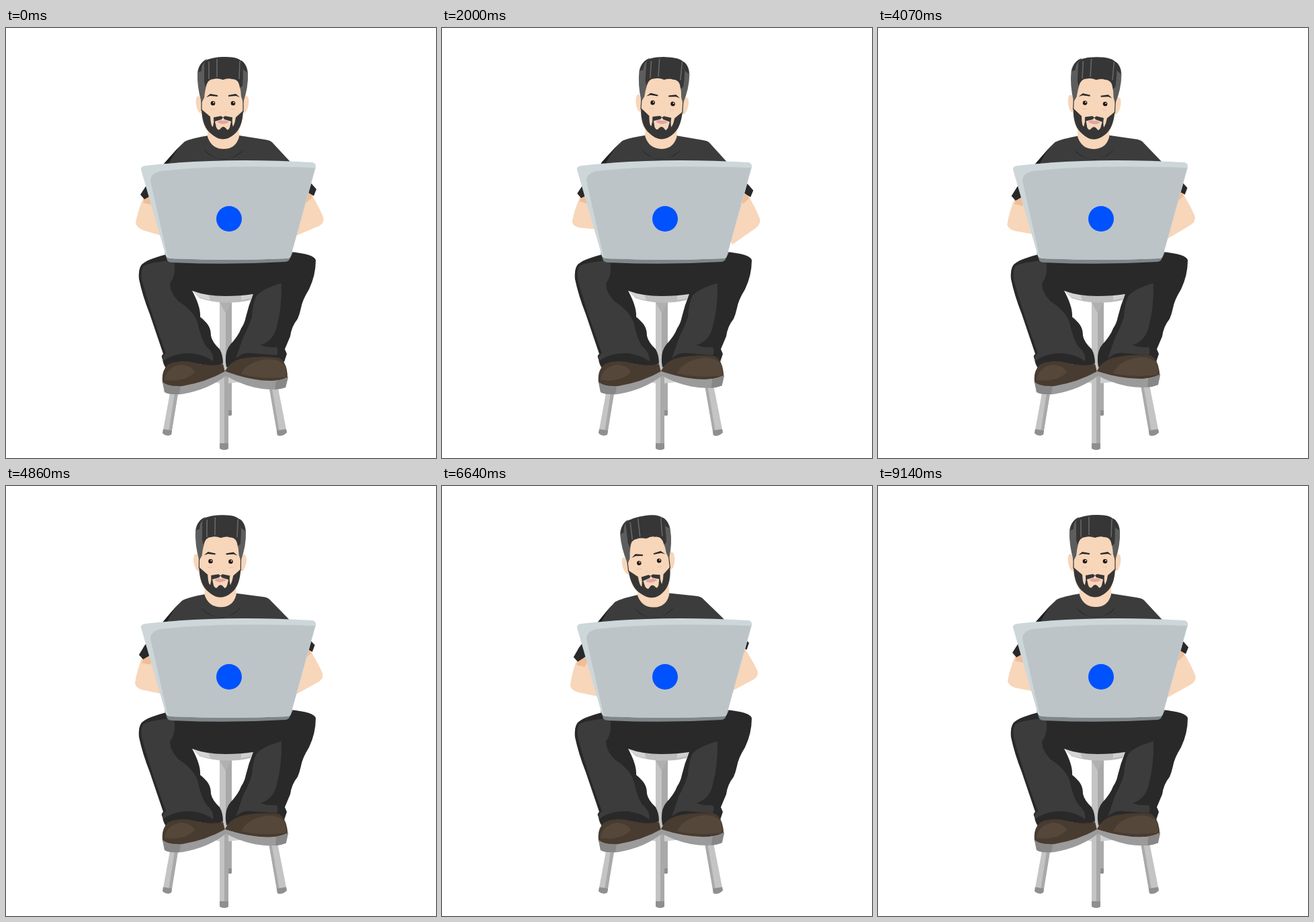
Write an HTML page that moves like this. It is 640 px wide and 640 px high and loops after 9.21 s.

```html
<!DOCTYPE html>
<html lang="en">
<head>
<meta charset="utf-8">
<title>Man typing on a stool</title>
<style>
  html, body { margin: 0; width: 100%; height: 100%; overflow: hidden; background: #fff; }
  svg { display: block; width: 100vw; height: 100vh; }
  .skin { fill: #f7d6ba; }
  .dark { fill: #292929; }
  .cloth { fill: #3c3c3c; }
  .hair { fill: #363636; }
  .steel { fill: #c4c4c4; }
  .shade { fill: #a9a9a9; }
  .tip { fill: #8f8f8f; }
</style>
</head>
<body>
<svg viewBox="0 0 640 640">
  <!-- stool -->
  <g>
    <path class="shade" d="M330 500H336V576Q333 578 330 576Z"/>
    <path class="tip" d="M330 569H336V576Q333 578 330 576Z"/>
    <path class="steel" d="M245 538H257L246 605Q239 609 233 603Z"/>
    <path class="shade" d="M252 538H257L246 605L241 607Z"/>
    <path class="tip" d="M234 597L247 599L246 605Q239 609 233 603Z"/>
    <path class="steel" d="M391 531H404L418 602Q411 609 404 606Z"/>
    <path class="shade" d="M391 531H395L408 607L404 606Z"/>
    <path class="tip" d="M403 599L417 597L418 602Q411 609 404 606Z"/>
    <path fill="#d0d0d0" d="M300 524L327 512L356 526L331 529L318 529Z"/>
    <path class="steel" d="M318 404H327V515H318Z"/>
    <path class="shade" d="M327 404H336V515H327Z"/>
    <path fill="#b0b0b0" d="M318 404H336V408L327 424L318 409Z"/>
    <path class="steel" d="M318 500H331V626Q325 630 318 626Z"/>
    <path class="shade" d="M325 515H331V626Q328 628 325 628Z"/>
    <path class="tip" d="M318 618H331V626Q325 630 318 626Z"/>
    <path fill="#bcbcbc" d="M275 388L288 402Q323 414 364 405L371 390Z"/>
    <path fill="#d4d4d4" d="M276 390L286 400Q295 404 304 405L301 396Z"/>
    <path fill="#d0d0d0" d="M350 398L370 394L366 402L350 405Z"/>
  </g>

  <!-- upper body -->
  <g id="body">
    <path id="leftArm" class="skin"/>
    <path id="rightArm" class="skin"/>
    <path fill="#efbd97" d="M208 250L204 260L216 263L224 250Z"/>
    <path fill="#efbd97" d="M453 246L456 252L447 260L440 245Z"/>
    <path class="dark" d="M225 215L209 234L200 248L206 255L222 246Z"/>
    <path class="dark" d="M435 215L455 232L462 240L458 250L440 239Z"/>
    <path class="cloth" d="M302 160Q276 164 266 169Q256 178 237 200L215 230L225 255H440L452 232L422 198L396 170Q393 167 385 166L347 160Z"/>
    <path fill="#202020" d="M261 173L235 202L242 202Q250 186 261 173Z"/>
    <path fill="#232323" d="M294 180Q324 211 354 180Q343 195 324 195Q305 195 294 180Z"/>
    <path class="skin" d="M300 140H347V162Q342 180 324 180Q306 180 300 162Z"/>

    <g id="head">
      <ellipse class="skin" cx="288" cy="114" rx="5" ry="13" transform="rotate(-10 288 114)"/>
      <ellipse class="skin" cx="356" cy="114" rx="5" ry="13" transform="rotate(10 356 114)"/>
      <path class="skin" d="M291 100Q293 72 323 72Q352 72 353 100V125Q351 164 323 164Q293 164 291 125Z"/>
      <path fill="#5d5d5d" d="M291 111Q284 87 285 66Q287 50 303 46V74Q297 84 295 104ZM353 111Q361 88 360 67Q359 50 343 46V74Q349 84 350 102Z"/>
      <path class="hair" d="M295 80V52Q299 44 323 43Q345 42 351 50Q354 62 352 86L348 89Q347 76 336 76Q331 74 323 77Q314 74 309 76Q300 76 297 88Z"/>
      <path class="hair" d="M286 66Q288 50 300 46L296 50Q291 54 291 64ZM350 48Q358 53 359 66L353 62Z"/>
      <path fill="none" stroke="#686868" stroke-width="1.6" d="M302 50V76M314 46V73M348 49L347 76"/>
      <path fill="none" stroke="#363636" stroke-width="1.2" d="M291 108V123M353 108V125"/>
      <path class="hair" d="M291 121L304 132Q305 147 308 147Q310 140 309 133L320 131L323 133L326 131L337 133Q336 142 338 147Q341 141 342 133L353 123Q352 148 340 158Q323 173 306 158Q292 148 291 121Z"/>
      <path class="skin" d="M311 139L321 136L323 133L325 136L335 139L333 148Q330 154 328 150Q323 144 319 150Q316 154 313 148Z"/>
      <path fill="#e2a5a3" d="M314 140Q319 136 323 138Q327 136 332 140Q323 146 314 140Z"/>
      <path class="dark" d="M298 103L304 98L315 100V102L304 101ZM348 103L342 98L331 100V102L342 101Z"/>
      <g fill="#241914">
        <circle cx="308" cy="112" r="3.3"/>
        <circle cx="338" cy="112" r="3.3"/>
      </g>
      <g fill="#fff">
        <circle cx="309" cy="111" r=".9"/>
        <circle cx="339" cy="111" r=".9"/>
      </g>
      <path fill="none" stroke="#f2c3a2" d="M304 121H311M334 121H341M318 124L319 126M328 124L327 126"/>
    </g>
  </g>

  <!-- trousers -->
  <path class="dark" d="M245 335C232 339 215 343 206 349Q196 354 198 374Q203 398 214 426L234 485Q230 488 233 493Q234 501 238 506Q252 496 270 497Q290 501 304 503Q316 504 323 499Q323 487 318 478Q307 468 305 458C305 446 301 440 289 430Q290 415 277 391Q298 399 326 399Q350 399 368 396Q361 413 357 430Q355 440 350 447Q346 458 334 471Q326 480 327 497L328 505L360 492L414 497L418 485L415 478L423 459Q425 444 434 433Q437 426 439 417Q441 405 451 389Q461 368 461 346Q460 336 420 333Z"/>
  <path class="cloth" d="M250 346Q214 348 204 355Q200 362 202 374Q213 416 238 484Q231 489 234 495Q252 483 276 484Q297 487 308 496Q311 485 298 474Q290 462 285 438Q279 421 257 407Q244 394 244 380Q254 368 250 346Z"/>
  <path class="cloth" d="M410 380Q384 387 373 398Q367 410 366 430Q361 446 353 460Q347 478 342 492Q352 482 366 484L403 487Q406 480 403 475Q389 476 379 472Q399 465 403 444Q411 415 410 380Z"/>

  <!-- shoes -->
  <path fill="#483b2f" d="M233 528Q231 510 241 501Q252 494 275 497Q302 505 323 500L326 512Q300 530 262 535L236 533Z"/>
  <path fill="#55473a" d="M236 524Q238 505 260 501Q277 502 281 512Q274 522 250 525Z"/>
  <path fill="#9b9b9b" d="M233 527Q240 534 262 533Q298 527 326 511L328 517Q302 538 262 545Q244 546 236 542Z"/>
  <path fill="#878787" d="M233 527Q244 535 260 533L258 545Q243 546 236 542Z"/>
  <g id="foot">
    <path fill="#483b2f" d="M326 511Q332 497 350 492Q380 487 407 491Q419 498 419 521Q396 529 360 523Z"/>
    <path fill="#55473a" d="M350 515Q358 497 388 493Q408 492 416 504Q418 514 416 520Q380 523 350 515Z"/>
    <path fill="#9b9b9b" d="M326 511Q365 525 394 525Q410 525 420 519.5L416 535Q398 541 370 535Q345 529 325 516Z"/>
    <path fill="#878787" d="M402 525Q412 523 420 519.5L416 535Q408 538 400 538Z"/>
  </g>

  <!-- laptop -->
  <path fill="#7f868a" d="M236 334L240 346Q242 349 248 349Q330 353 416 348Q421 347 422 344L427 334Z"/>
  <path fill="#cdd7d9" d="M201 211Q200 206 207 205Q320 192 456 200Q462 201 461 208L424 339Q423 343 418 343Q330 347 246 343Q240 343 238 339Z"/>
  <path fill="#bdc4c8" d="M215 228Q214 217 230 213Q320 203 460 208L424 339Q423 343 418 343Q330 347 246 343Q241 342 240 338Z"/>
  <circle cx="332" cy="284" r="19" fill="#0052ff"/>
</svg>
<script>
const LOOP = 9210, STEP = 71.4;
const part = id => document.getElementById(id);
const body = part('body'), head = part('head'), foot = part('foot');
const leftArm = part('leftArm'), rightArm = part('rightArm');

// time, body lean, head tilt (degrees), linear approach
const poses = [
  [0, 0, 0], [930, 0, 0], [3000, 1.5, 5.2], [3710, 1.5, 5.1], [4070, -.9, 3.9],
  [5790, -2, 0, true], [6750, -3, -4.3, true], [7710, -3, -4.3], [9100, 0, 0], [LOOP, 0, 0]
];

// 0 at the start of each period, 1 halfway
const wave = (t, period) => (1 - Math.cos(2 * Math.PI * t / period)) / 2;

function poseAt(t) {
  const i = poses.findIndex(p => p[0] > t);
  const from = poses[i - 1], to = poses[i];
  const u = (t - from[0]) / (to[0] - from[0]);
  const k = to[3] ? u : wave(u, 2);
  return [1, 2].map(n => from[n] + (to[n] - from[n]) * k);
}

const turn = (el, angle, x, y) => el.setAttribute('transform', `rotate(${angle} ${x} ${y})`);

function draw(now) {
  const t = Math.floor(now % LOOP / STEP + .03) * STEP % LOOP;
  const [lean, tilt] = poseAt(t);
  turn(body, lean, 331, 336);
  turn(head, tilt, 323, 165);
  turn(foot, -2.6 * wave(t, 427), 327, 514);

  const typing = wave(t, 267);
  leftArm.setAttribute('d',
    `M207 247Q197 268 193 290Q194 297 204 ${301 - 2 * typing}L231 ${309 - 8 * typing}L250 290L230 250Z`);
  rightArm.setAttribute('d',
    `M453 245Q464 262 472 281Q475 290 465 ${295 + 2 * typing}L432 ${309 + 12 * typing}L415 290L440 245Z`);
  requestAnimationFrame(() => draw(performance.now()));
}
draw(performance.now());
</script>
</body>
</html>
```
